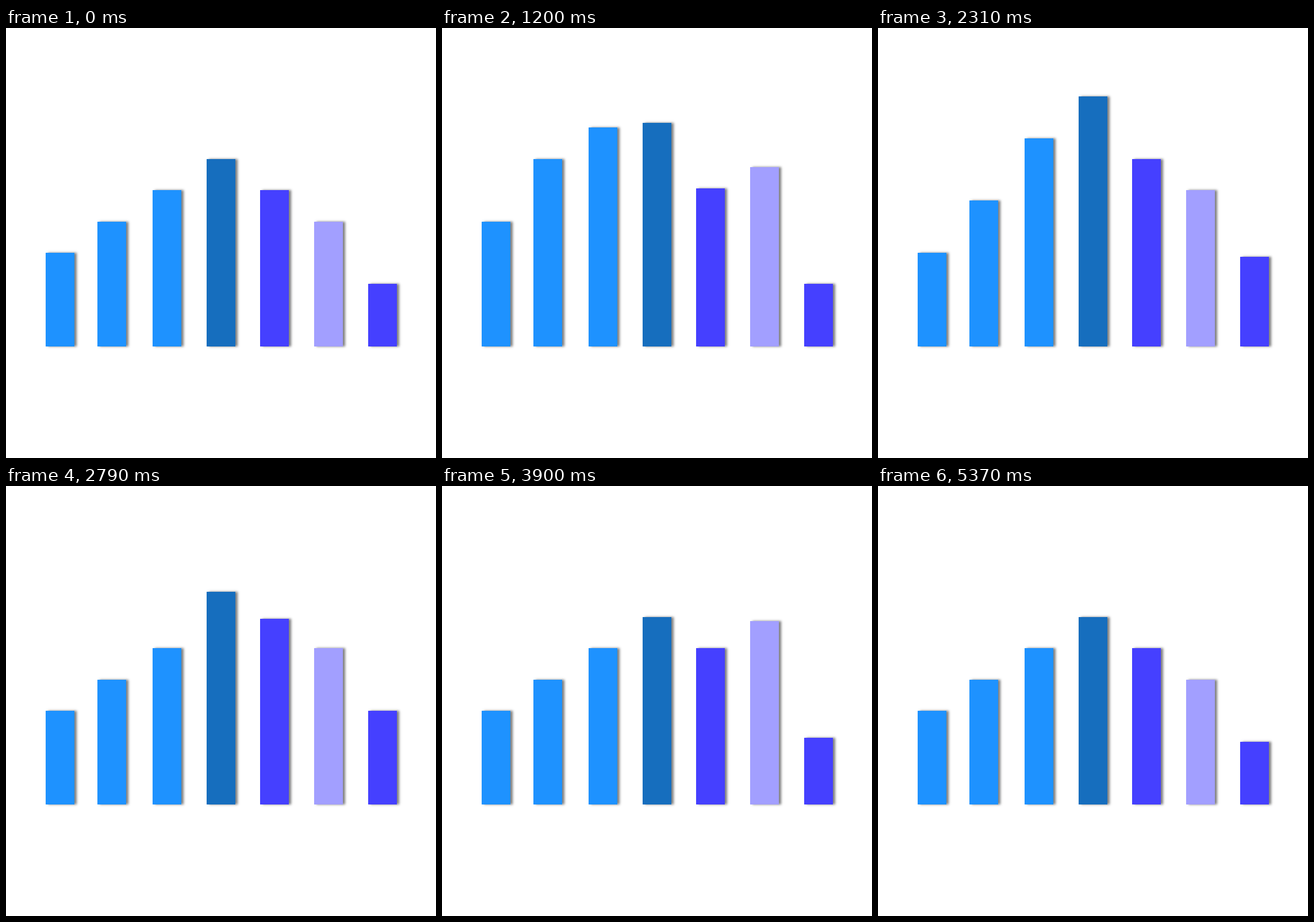
Recreate the animation shown at these times as an HTML page. Size 748 by 748 pixels, loop 5400 ms.

```html
<!DOCTYPE html>
<html>
<head>
<meta charset="utf-8">
<style>
html, body { margin: 0; width: 100%; height: 100%; overflow: hidden; background: #fff; }
body { position: relative; }
.bar { position: absolute; width: 50px; box-shadow: 4px 0 4px rgba(0, 0, 0, .5); }
#dash { position: absolute; top: 592.5px; height: 17.5px; border-radius: 9px; background: #ff6a0e; }
</style>
</head>
<body>
<div id="dash"></div>
<script>
const LOOP = 5400, STEP = 30, BASE = 554, UNIT = 54.36;
const BLUE = '#1e92ff', DARK = '#166ebe', INDIGO = '#4540ff', LILAC = '#a29fff';

// Keys: [step, height in units], linear in between.
const pulse = (low, high, a, b, c, d) => [[a, low], [b, high], [c, high], [d, low]];
const bars = [
  { x: 69, color: BLUE, keys: pulse(3, 4, 4, 18, 54, 69) },
  { x: 159, color: BLUE, keys: pulse(4, 6, 16, 31, 67.1, 82.1) },
  { x: 255, color: BLUE, keys: pulse(5, 7, 23.7, 38.7, 74.5, 89.5) },
  { x: 349, color: DARK, keys: pulse(6, 8, 31.3, 46.3, 84, 99) },
  { x: 442, color: INDIGO, keys: pulse(5, 6, 39, 54, 92, 107) },
  { x: 536, color: LILAC, keys: [[0, 4], [46, 6], [76, 5], [97, 5], [127, 6], [175, 4]] },
  { x: 630, color: INDIGO, keys: pulse(2, 3, 64, 79, 113.3, 132.6) }
];

for (const bar of bars) {
  bar.el = document.body.appendChild(document.createElement('div'));
  bar.el.className = 'bar';
  bar.el.style.left = bar.x + 'px';
  bar.el.style.background = bar.color;
}

const clamp = v => Math.min(1, Math.max(0, v));

function valueAt(keys, n) {
  let value = keys[0][1];
  for (let i = 1; i < keys.length; i++) {
    const [a, from] = keys[i - 1], [b, to] = keys[i];
    value += (to - from) * clamp((n - a) / (b - a));
  }
  return value;
}

function drawDash(n) {
  const tail = clamp((n - 16.86) / 15), head = clamp((n - 14) / 15);
  dash.style.display = head > tail ? 'block' : 'none';
  dash.style.left = 53 + 656 * tail + 'px';
  dash.style.width = 18 + 656 * (head - tail) + 'px';
}

const dash = document.getElementById('dash');
const start = performance.now();

function draw() {
  const n = Math.floor((performance.now() - start) % LOOP / STEP);
  for (const { el, keys } of bars) {
    const height = UNIT * valueAt(keys, n);
    el.style.top = BASE - height + 'px';
    el.style.height = height + 'px';
  }
  drawDash(n);
  requestAnimationFrame(draw);
}
draw();
</script>
</body>
</html>
```
